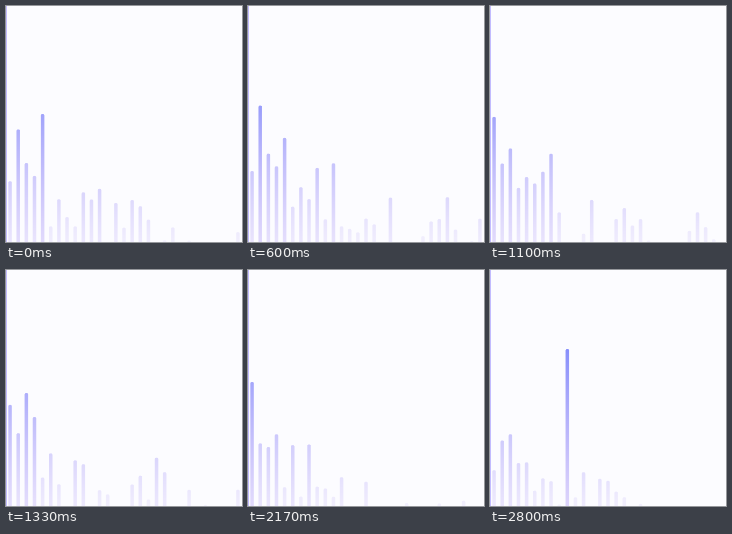
A matplotlib script for the animation above (2.83 s loop, 236x236 px).

```python
import numpy as np
import matplotlib.pyplot as plt
from matplotlib.animation import FuncAnimation
from matplotlib.colors import to_rgb

SIZE = 236
LOOP_MS, STEP_MS = 2830, 10
FPS = 30
TICKS = 85
BARS = 29
PITCH = SIZE / BARS
HALF = 1.75
PEAK = 157

BACK = np.array(to_rgb("#fcfcff"))
LOW_INK = np.array(to_rgb("#a48cf6"))
HIGH_INK = np.array(to_rgb("#6a74fb"))
EDGE = np.array(to_rgb("#c2bbff"))

# The loudest note of each beat: tick, band, height.
BEATS = [(0, 4, 128), (10, 0, 148), (26, 1, 131), (40, 2, 113),
         (53, 4, 144), (65, 0, 124), (84, 9, PEAK)]


def make_spectrum():
    """Bar heights per tick: a falling spectrum, smoothed noise and the beats."""
    rng = np.random.default_rng(12)
    noise = rng.normal(size=(TICKS, BARS))
    noise = (np.roll(noise, 1, 0) + 2 * noise + np.roll(noise, -1, 0)) / 6 ** 0.5
    band = np.arange(BARS)
    tick = np.arange(TICKS)
    mean = 114 * np.exp(-band / 12) - 18
    spread = 30 * np.exp(-band / 40)
    quiet = np.clip((tick - 55) / 10, 0, 1)[:, None]
    h = mean + spread * noise - 14 * quiet
    for at, bar, top in BEATS:
        swell = np.exp(-((tick - at) / 2) ** 2)
        h[:, bar] += (top - h[:, bar]) * swell
    return np.clip(h, 0, 174)


spectrum = make_spectrum()

# Pixel centres, the bar over each column and the distance to its axis.
px = np.arange(SIZE) + 0.5
bar_of = np.minimum((px / PITCH).astype(int), BARS - 1)
offset = np.abs(px - (bar_of + 0.5) * PITCH)
side = np.clip(HALF + 0.5 - offset, 0, 1)
cap = HALF - np.sqrt(np.clip(HALF ** 2 - offset ** 2, 0, None))
level = (SIZE - px)[:, None]
ink = LOW_INK + (HIGH_INK - LOW_INK) * np.clip(level / PEAK, 0, 1)[..., None]


def render(tick):
    h = spectrum[tick][bar_of]
    cover = side * np.clip(h - cap * 0.6 - level + 0.5, 0, 1) * (h >= 1)
    strength = 0.1 + 0.45 * level / PEAK + 0.25 * h / PEAK
    alpha = np.clip(cover * strength, 0, 1)[..., None]
    image = BACK + (ink - BACK) * alpha
    image[:, 0] = EDGE
    return image


fig = plt.figure(figsize=(SIZE / 100, SIZE / 100), dpi=100, facecolor=BACK)
ax = fig.add_axes([0, 0, 1, 1])
ax.axis("off")
stage = ax.imshow(render(0), interpolation="nearest", aspect="auto")


def update(n):
    tick = int((n * STEP_MS + STEP_MS / 2) * FPS / 1000)
    stage.set_data(render(tick))
    return [stage]


anim = FuncAnimation(fig, update, frames=LOOP_MS // STEP_MS, interval=STEP_MS,
                     repeat=True, repeat_delay=0, cache_frame_data=False)
plt.show()
```
